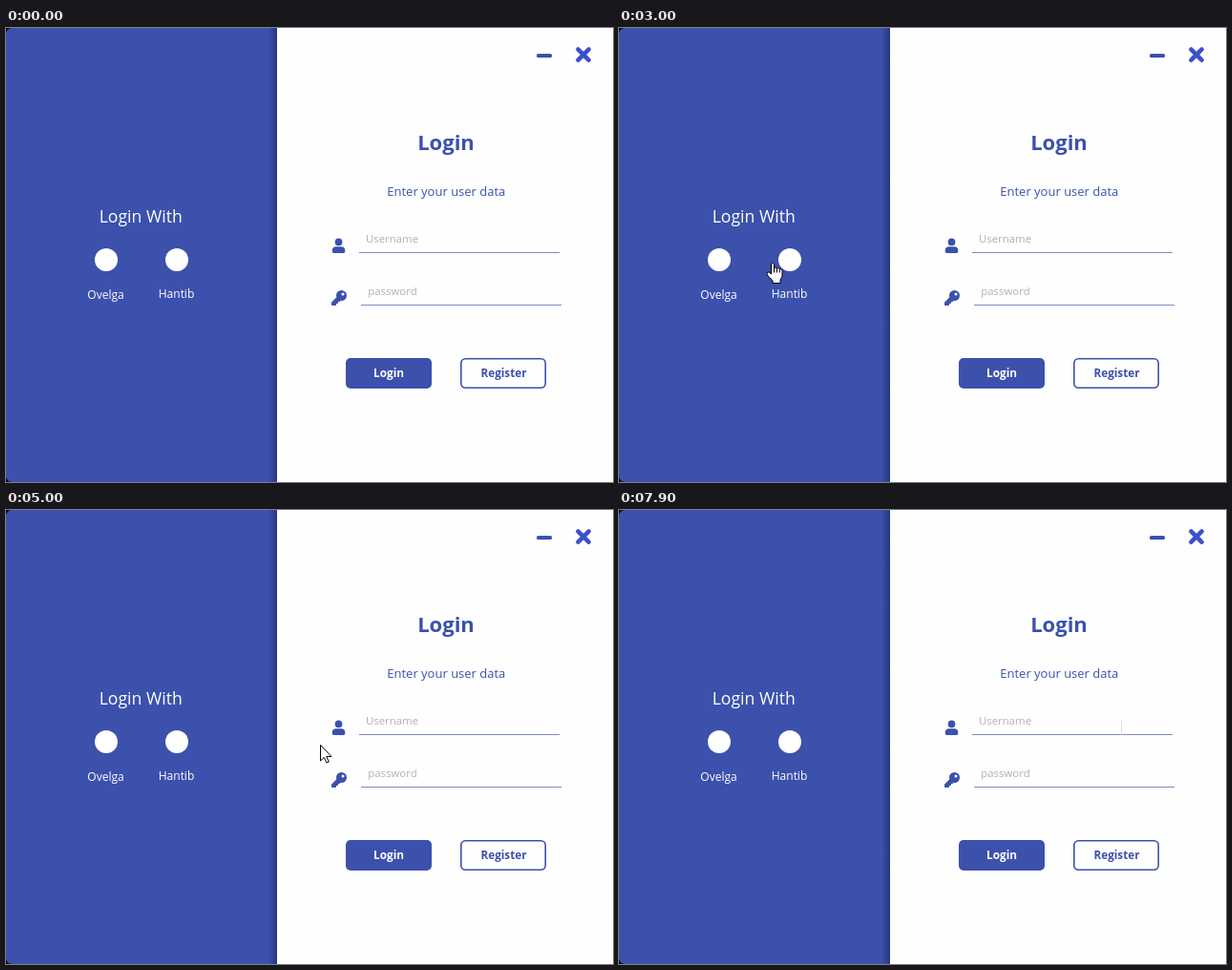
Animation of 636x476 px, one loop 8 s. Source, as an HTML page with a canvas:

```html
<!DOCTYPE html>
<html lang="en">
<head>
<meta charset="utf-8">
<title>Login</title>
<style>
  html, body { margin: 0; width: 100%; height: 100%; overflow: hidden; background: #fefefe; }
  canvas { display: block; width: 636px; height: 476px; }
</style>
</head>
<body>
<canvas id="stage" width="636" height="476"></canvas>
<script>
const ctx = document.getElementById('stage').getContext('2d');
const LOOP = 8000, STEP = 100;
const BLUE = '#3b51ab', CROSS = '#3e4fcb', PAPER = '#fefefe';
const FONT = '"Open Sans", "Noto Sans", sans-serif';

// Pointer strokes: start, end, kind, from x, y, to x, y. The last pose holds until the next stroke.
const strokes = [
  [1200, 1700, 'arrow', 43, 11, 107, 219],
  [1800, 1900, 'hand', 100, 238, 97, 243],
  [2400, 2400, 'hand', 98, 244, 98, 244],
  [2900, 2900, 'arrow', 134, 250, 134, 250],
  [3000, 3000, 'hand', 154, 245, 154, 245],
  [3300, 3300, 'hand', 156, 245, 156, 245],
  [4100, 4400, 'hand', 157, 252, 164, 281],
  [4500, 4500, 'arrow', 203, 282, 203, 282],
  [4700, 5000, 'arrow', 230, 275, 329, 246],
  [5100, 5200, 'arrow', 346, 240, 360, 235],
  [5300, 5500, 'beam', 395, 225, 429, 219],
  [5800, 5800, 'none', 0, 0, 0, 0],
  [6000, 6300, 'arrow', 486, 161, 557, 45],
  [6400, 6500, 'hand', 556, 30, 555, 27],
  [6700, 6700, 'hand', 549, 35, 549, 35],
  [6800, 6800, 'arrow', 586, 39, 586, 39],
  [7000, 7100, 'hand', 597, 34, 599, 34],
  [7500, 7800, 'arrow', 596, 52, 537, 196],
  [7900, 7900, 'beam', 526, 221, 526, 221]
];

const hand = new Path2D('M5 12.5V1.6Q6.5-.6 8 1.6V6Q9.6 4.8 11 6.5Q12.7 5.4 13.8 7.2Q15.8 6.6 16.5 8.8V14Q16.2 16 14.5 18.5V22H6.5V19.5L1 13.6Q-.2 11.5 1.4 10.5Q3 10 5 12.5Z');
const knuckles = new Path2D('M8 6V11M11 6.5V11M13.8 7.2V11');
const arrow = new Path2D('M0 0V16.5L3.8 12.9L6.4 18.5L8.8 17.5L6.3 12H11.5Z');
const keyShaft = new Path2D('M.2 12.4L5.4 7.3L9.5 10.9L8.4 12H7V13.3Q7 14 6.3 14H5V15.3Q5 16 4.3 16H.7Q0 16 0 15.3V13Z');

const within = (t, a, b) => t >= a && t < b;

function text(str, x, y, size, color, weight = 400, align = 'left') {
  ctx.font = `${weight} ${size}px ${FONT}`;
  ctx.textAlign = align;
  ctx.fillStyle = color;
  ctx.fillText(str, x, y);
}

function box(x, y, w, h, r, color) {
  ctx.fillStyle = color;
  ctx.beginPath();
  ctx.roundRect(x, y, w, h, r);
  ctx.fill();
}

function disc(x, y, r, color) {
  ctx.fillStyle = color;
  ctx.beginPath();
  ctx.arc(x, y, r, 0, Math.PI * 2);
  ctx.fill();
}

function line(x1, y1, x2, y2, width, color, cap = 'butt') {
  ctx.strokeStyle = color;
  ctx.lineWidth = width;
  ctx.lineCap = cap;
  ctx.beginPath();
  ctx.moveTo(x1, y1);
  ctx.lineTo(x2, y2);
  ctx.stroke();
}

function at(x, y, scale, draw) {
  ctx.save();
  ctx.translate(x, y);
  ctx.scale(scale, scale);
  draw();
  ctx.restore();
}

function sidePanel(t) {
  ctx.fillStyle = '#000';
  ctx.fillRect(0, 0, 10, 476);
  box(0, 0, 284, 476, [6, 0, 0, 6], BLUE);
  const shade = ctx.createLinearGradient(275, 0, 284, 0);
  shade.addColorStop(0, 'rgba(0,0,30,0)');
  shade.addColorStop(1, 'rgba(0,0,30,.32)');
  ctx.fillStyle = shade;
  ctx.fillRect(275, 0, 9, 476);

  text('Login With', 141.2, 204, 17.6, '#fff', 400, 'center');
  const first = within(t, 1800, 2900);
  const second = within(t, 3100, 4700);
  provider('Ovelga', 105 - (second ? 2 : 0), 284, first);
  provider('Hantib', 179 + (first ? 2 : 0), 283, second);
}

// A bold label widens its column and pushes the other one outwards.
function provider(name, x, y, hover) {
  disc(x, 243, 12, '#fff');
  text(name, x - 0.5, y, 12, '#fff', hover ? 700 : 400, 'center');
}

function form() {
  text('Login', 461, 128, 22, BLUE, 700, 'center');
  text('Enter your user data', 461.3, 176, 13, BLUE, 400, 'center');

  at(341.8, 220.6, 0.96, () => {
    disc(7, 4, 4, BLUE);
    box(0, 9, 14, 7, [4.2, 4.2, 1.5, 1.5], BLUE);
  });
  text('Username', 377, 225, 11.4, '#b1b1b1');
  line(370, 235.5, 580, 235.5, 1, '#7c8ac6');

  at(341, 275, 1, () => {
    disc(10.5, 5.5, 5.5, BLUE);
    ctx.fill(keyShaft);
    disc(12, 4, 1.5, PAPER);
  });
  text('password', 379.3, 280, 11.4, '#b1b1b1');
  line(372, 290.5, 582, 290.5, 1, '#7c8ac6');

  box(356, 346, 90, 32, 5, BLUE);
  text('Login', 401, 366, 11.8, '#fff', 700, 'center');
  box(476, 346, 90, 32, 5.5, BLUE);
  box(477.6, 347.6, 86.8, 28.8, 4, PAPER);
  text('Register', 521.5, 366, 11.7, BLUE, 700, 'center');
}

function windowButtons(t) {
  at(564, 29, within(t, 6400, 6800) ? 1.5 : 1, () => box(-8, -2, 16, 4, 1.6, BLUE));
  at(605, 28, within(t, 7000, 7500) ? 1.5 : 1, () => {
    line(-5.6, -5.6, 5.6, 5.6, 4.6, CROSS, 'round');
    line(5.6, -5.6, -5.6, 5.6, 4.6, CROSS, 'round');
  });
}

function pointer(t) {
  const stroke = strokes.findLast(s => s[0] <= t);
  if (!stroke || stroke[2] === 'none') return;
  const [start, end, kind, x1, y1, x2, y2] = stroke;
  const p = end > start ? Math.min(1, (t - start) / (end - start)) : 1;
  const x = Math.round(x1 + (x2 - x1) * p);
  const y = Math.round(y1 + (y2 - y1) * p);
  at(x + 0.5, y + 0.5, 1, () => {
    if (kind === 'beam') {
      line(0, 1, 0, 15, 1, '#dedede');
      line(-2.5, 0, 2.5, 0, 1, '#f0f0f0');
      return;
    }
    const shape = kind === 'hand' ? hand : arrow;
    ctx.fillStyle = '#fff';
    ctx.strokeStyle = '#000';
    ctx.lineWidth = 1;
    ctx.lineJoin = 'round';
    ctx.fill(shape);
    ctx.stroke(shape);
    if (kind === 'hand') ctx.stroke(knuckles);
  });
}

function draw(t) {
  ctx.fillStyle = PAPER;
  ctx.fillRect(0, 0, 636, 476);
  sidePanel(t);
  form();
  windowButtons(t);
  pointer(t);
}

const begin = performance.now();
function frame() {
  const t = (performance.now() - begin) % LOOP;
  draw(Math.floor(t / STEP) * STEP);
  requestAnimationFrame(frame);
}
frame();
</script>
</body>
</html>
```
